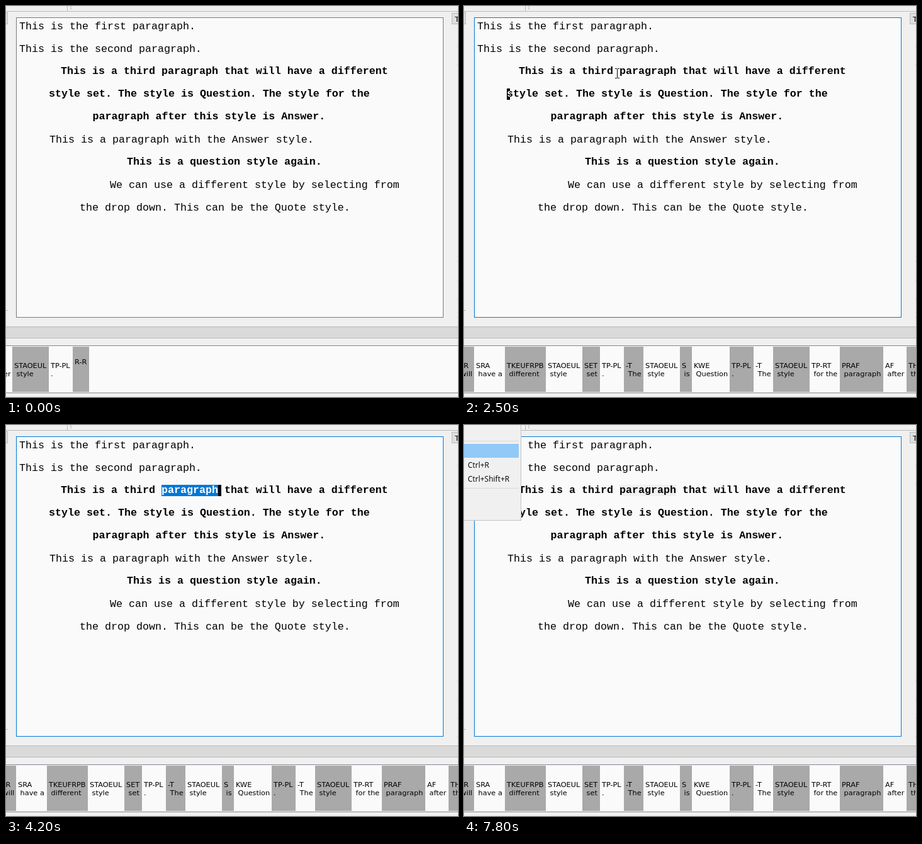
Recreate the animation shown at these times as an HTML page. Size 718 by 621 pixels, loop 8 s.

```html
<!DOCTYPE html>
<html lang="en">
<head>
<meta charset="utf-8">
<title>Editor with paper tape</title>
<style>
  html, body { margin: 0; width: 100%; height: 100%; overflow: hidden; background: #f0f0f0; }
  svg { display: block; }
  text { white-space: pre; }
  .page text, .mono { font: 16.667px "Liberation Mono", "Courier New", monospace; }
  .page .b, .mono { font-weight: bold; }
  .ui { font: 11.3px "DejaVu Sans", Verdana, sans-serif; }
  .menu text { font: 12px "Open Sans", "Noto Sans", sans-serif; }
  .line { stroke: #b9b9b9; fill: none; }
  .inv { fill: #fff; }

  .anim { animation: 8s step-end infinite; }
  .old { animation-name: old; }
  .new { animation-name: new; }
  .caret-line { animation-name: caret-line; }
  .caret-word { animation-name: caret-word; }
  .selected { animation-name: selected; }
  .menu { animation-name: menu; }
  .hover-top { animation-name: hover-top; }
  .hover-next { animation-name: hover-next; }
  .pointer { animation-name: pointer; mix-blend-mode: difference; }

  @keyframes old { 0% { opacity: 1 } 23.75%, 100% { opacity: 0 } }
  @keyframes new { 0% { opacity: 0 } 23.75%, 100% { opacity: 1 } }
  @keyframes caret-line { 0% { opacity: 0 } 23.75% { opacity: 1 } 37.5%, 100% { opacity: 0 } }
  @keyframes caret-word { 0% { opacity: 0 } 37.5% { opacity: 1 } 38.75%, 100% { opacity: 0 } }
  @keyframes selected { 0% { opacity: 0 } 38.75% { opacity: 1 } 88.75%, 100% { opacity: 0 } }
  @keyframes menu { 0% { opacity: 0 } 88.75%, 100% { opacity: 1 } }
  @keyframes hover-top { 0% { opacity: 0 } 96.25% { opacity: 1 } 97.5%, 100% { opacity: 0 } }
  @keyframes hover-next { 0% { opacity: 0 } 97.5%, 100% { opacity: 1 } }
  @keyframes pointer {
    0% { opacity: 0; transform: translate(609px, 54px) }
    2.5% { opacity: 1; transform: translate(609px, 54px) }
    3.75% { opacity: 1; transform: translate(496px, 92px) }
    5% { opacity: 1; transform: translate(396px, 121px) }
    8.75% { opacity: 1; transform: translate(385px, 122px) }
    10% { opacity: 1; transform: translate(358px, 126px) }
    11.25% { opacity: 1; transform: translate(324px, 130px) }
    28.75% { opacity: 1; transform: translate(310px, 136px) }
    30% { opacity: 1; transform: translate(272px, 126px) }
    31.25% { opacity: 1; transform: translate(243px, 107px) }
    32.5% { opacity: 1; transform: translate(239px, 96px) }
    33.75% { opacity: 1; transform: translate(262px, 103px) }
    35% { opacity: 1; transform: translate(278px, 110px) }
    47.5% { opacity: 1; transform: translate(272px, 102px) }
    48.75% { opacity: 1; transform: translate(245px, 75px) }
    50% { opacity: 1; transform: translate(212px, 48px) }
    51.25% { opacity: 1; transform: translate(175px, 24px) }
    52.5%, 100% { opacity: 0; transform: translate(175px, 24px) }
  }
</style>
</head>
<body>
<svg id="stage" width="718" height="621" viewBox="0 0 718 621">
  <rect width="718" height="621" fill="#f0f0f0"/>

  <!-- window chrome -->
  <path class="line" d="M0 8.5H718M97.5 0V8M0 483.5H3M717 64.5h1M717 93.5h1M717 405.5h1M717 435.5h1M717 465.5h1M717 494.5h1"/>
  <path d="M102 1h2v1h-2zM102 4h2v1h-2z" fill="#a0a0a0"/>
  <rect class="line" x="-4.5" y="10.5" width="7" height="18" style="fill:#e1e1e1"/>
  <rect class="line" x="708.5" y="11.5" width="20" height="17" style="fill:#dedede"/>
  <text class="ui" x="713" y="25">T</text>
  <rect class="line" x="-1" y="509.5" width="720" height="18" style="fill:#dadada"/>

  <!-- editor -->
  <rect x="16.5" y="18.5" width="678" height="476" fill="#fafafa" stroke="#7a7a7a"/>
  <rect class="anim new" x="16.5" y="18.5" width="678" height="476" fill="none" stroke="#0078d7"/>
  <rect class="anim menu" x="247" y="95" width="90" height="18" fill="#f0f0f0"/>
  <g class="page">
    <text x="21" y="37">This is the first paragraph.</text>
    <text x="21" y="73">This is the second paragraph.</text>
    <text class="b" x="87" y="108">This is a third paragraph that will have a different</text>
    <text class="b" x="68" y="144">style set. The style is Question. The style for the</text>
    <text class="b" x="137.5" y="180">paragraph after this style is Answer.</text>
    <text x="69" y="217">This is a paragraph with the Answer style.</text>
    <text class="b" x="192" y="252">This is a question style again.</text>
    <text x="165" y="289">We can use a different style by selecting from</text>
    <text x="117" y="325">the drop down. This can be the Quote style.</text>
  </g>

  <!-- carets and selection -->
  <svg class="anim caret-line" x="68" y="131" width="5" height="18">
    <rect width="5" height="18"/>
    <text class="mono inv" y="13">s</text>
  </svg>
  <svg class="anim caret-word" x="277" y="95" width="5" height="18">
    <rect width="5" height="18"/>
    <text class="mono inv" y="13">a</text>
  </svg>
  <g class="anim selected">
    <rect x="247" y="95" width="90" height="18" fill="#0078d7"/>
    <text class="mono inv" x="247" y="108">paragraph</text>
    <rect x="337" y="95" width="5" height="18"/>
  </g>

  <!-- paper tape -->
  <rect x="-1" y="539.5" width="720" height="75" fill="#fafafa" stroke="#828790"/>
  <g id="before" class="ui anim old"></g>
  <g id="after" class="ui anim new"></g>

  <!-- open menu -->
  <g class="anim menu">
    <rect x="-1" y="-1" width="91.5" height="152.5" fill="#f0f0f0" stroke="#c3c3c3"/>
    <path d="M0 25.5H87M0 100.5H87" stroke="#d7d7d7"/>
    <rect class="anim hover-top" width="87" height="21" fill="#91c9f7"/>
    <rect class="anim hover-next" y="30" width="87" height="22" fill="#91c9f7"/>
    <text x="6" y="68">Ctrl+R</text>
    <text x="6" y="90">Ctrl+Shift+R</text>
  </g>

  <path class="anim pointer" d="M-3-7.5h3M1-7.5h3M.5-7v14M-3 7.5h3M1 7.5h3" stroke="#fff" fill="none"/>
</svg>
<script>
  const NS = "http://www.w3.org/2000/svg";

  function add(parent, tag, attrs, text = "") {
    const el = document.createElementNS(NS, tag);
    for (const key in attrs) el.setAttribute(key, attrs[key]);
    el.textContent = text;
    parent.append(el);
  }

  // Each cell: left edge, stroke, word. Shading alternates.
  function tape(id, cells, end, shaded) {
    const group = document.getElementById(id);
    cells.forEach(([x, stroke, word, y = 575], i) => {
      const next = i + 1 < cells.length ? cells[i + 1][0] : end;
      const fill = (i % 2 === 0) === shaded ? "#a9a9a9" : "#fafafa";
      add(group, "rect", { x, y: 541, width: next - x, height: 72, fill });
      add(group, "text", { x: x + 3, y }, stroke);
      add(group, "text", { x: x + 3, y: y + 13 }, word);
    });
  }

  tape("before", [
    [-7, "", "er"], [10, "STAOEUL", " style"], [68, "TP-PL", "."], [106, "R-R", "", 569]
  ], 132, false);

  tape("after", [
    [-12, "HR", " will"], [16, "SRA", " have a"], [65, "TKEUFRPB", " different"],
    [130, "STAOEUL", " style"], [188, "SET", " set"], [216, "TP-PL", "."],
    [254, "-T", " The"], [285, "STAOEUL", " style"], [343, "S", " is"],
    [362, "KWE", " Question"], [422, "TP-PL", "."], [460, "-T", " The"],
    [491, "STAOEUL", " style"], [549, "TP-RT", " for the"], [597, "PRAF", " paragraph"],
    [666, "AF", " after"], [703, "THEUS", " this"]
  ], 740, true);
</script>
</body>
</html>
```
